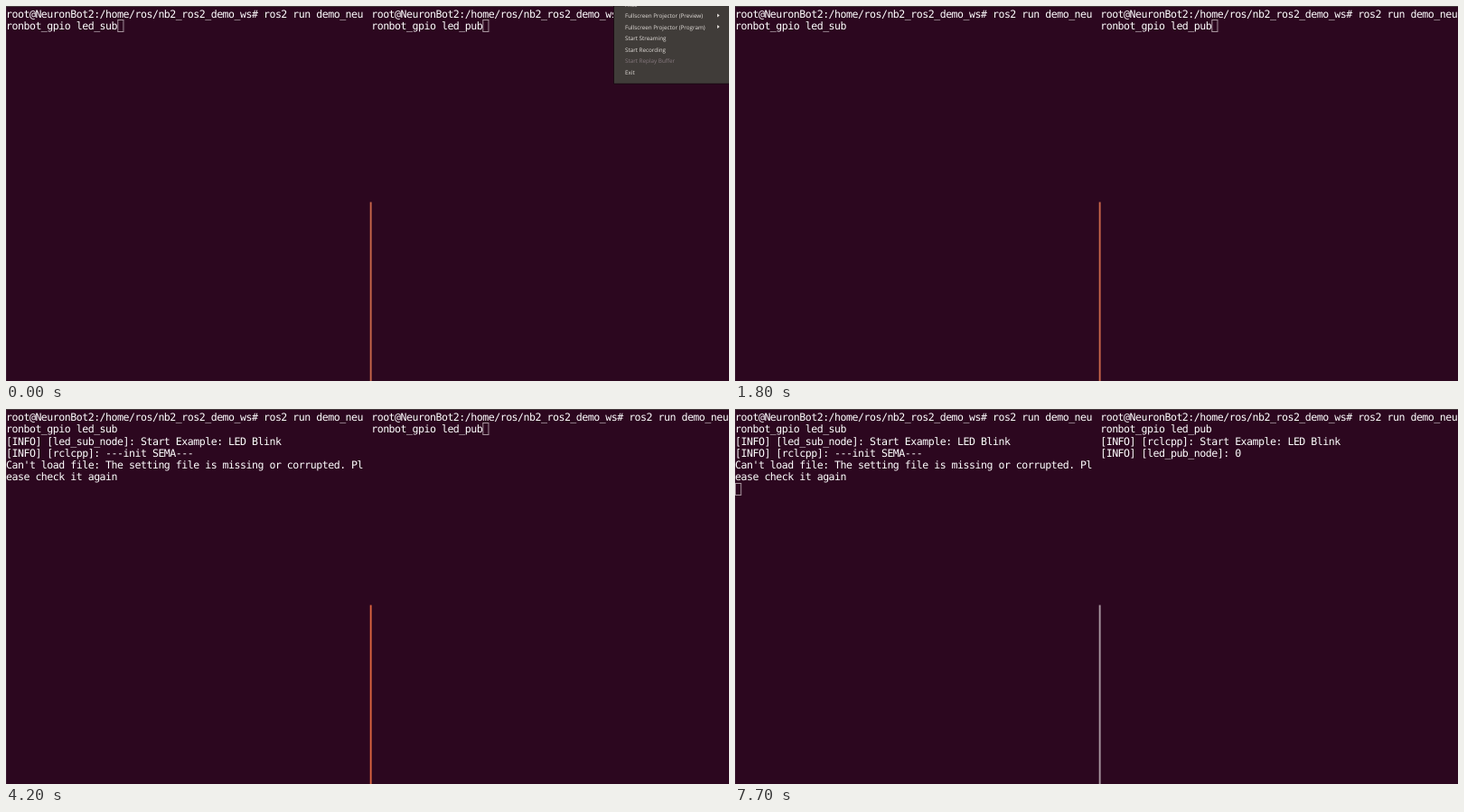
These frames come from a looping animation (800 px wide and 416 px high, 8000 ms). An HTML page:

```html
<!DOCTYPE html>
<html lang="en">
<head>
<meta charset="utf-8">
<title>Two terminals</title>
<style>
  html, body { margin: 0; width: 100%; height: 100%; overflow: hidden; background: #2c071f; }
  svg { display: block; width: 800px; height: 416px; }
  text { text-rendering: geometricPrecision; white-space: pre; }
  .term { font: 11.6px "DejaVu Sans Mono", monospace; letter-spacing: -.504px; fill: #fff; }
  .menu { font: 6.3px "Open Sans", sans-serif; fill: #e4e0dc; }
  .menu .off { fill: #85787e; }
  .block { fill: #fff; }
  .hollow { fill: none; stroke: #a8969f; }

  /* One 8 s loop: 1% is 80 ms, every change is hard. */
  .t { animation: 8s step-end infinite; }

  .menu { animation-name: menu; }
  .beam { animation-name: beam; }
  .split { animation-name: split; }
  .l-idle { animation-name: l-idle; }
  .l-type { animation-name: l-type; }
  .l-enter { animation-name: l-enter; }
  .l-wait { animation-name: l-wait; }
  .l-blur { animation-name: l-blur; }
  .l-info { animation-name: l-info; }
  .l-error { animation-name: l-error; }
  .r-idle { animation-name: r-idle; }
  .r-type { animation-name: r-type; }
  .r-enter { animation-name: r-enter; }
  .r-info { animation-name: r-info; }

  @keyframes menu {
    0% { opacity: 1; transform: none; }
    1.25% { opacity: .11; transform: translateY(4px); }
    2.5% { opacity: .04; transform: translateY(4px); }
    3.75%, 100% { opacity: 0; transform: translateY(4px); }
  }
  @keyframes beam { 0%, 2.5%, 100% { opacity: 0; } 1.25% { opacity: 1; } }
  @keyframes split {
    0% { fill: #c8664a; }
    52.5% { fill: #db6440; }
    66.25%, 100% { fill: #a8959f; }
  }
  @keyframes l-idle { 0% { opacity: 1; } 1.25%, 100% { opacity: 0; } }
  @keyframes l-type { 0%, 7.5%, 22.5%, 100% { opacity: 0; } 1.25%, 15% { opacity: 1; } }
  @keyframes l-enter { 0%, 37.5%, 100% { opacity: 0; } 30% { opacity: 1; } }
  @keyframes l-wait { 0%, 52.5%, 66.25%, 100% { opacity: 0; } 45%, 60% { opacity: 1; } }
  @keyframes l-blur { 0% { opacity: 0; } 66.25%, 100% { opacity: 1; } }
  @keyframes l-info { 0% { opacity: 0; } 37.5%, 100% { opacity: 1; } }
  @keyframes l-error { 0% { opacity: 0; } 38.75%, 100% { opacity: 1; } }
  @keyframes r-idle { 0% { opacity: 1; } 66.25%, 100% { opacity: 0; } }
  @keyframes r-type { 0%, 73.75%, 87.5%, 100% { opacity: 0; } 66.25%, 81.25% { opacity: 1; } }
  @keyframes r-enter { 0%, 93.75%, 100% { opacity: 0; } 87.5% { opacity: 1; } }
  @keyframes r-info { 0% { opacity: 0; } 96.25%, 100% { opacity: 1; } }
</style>
</head>
<body>
<svg viewBox="0 0 800 416">
  <defs>
    <rect id="block" width="6.6" height="13.5"/>
    <rect id="hollow" x=".5" y=".5" width="6.2" height="13"/>
    <path id="arrow" d="M0-2 2.6 0 0 2Z"/>
  </defs>
  <rect width="800" height="416" fill="#2c071f"/>
  <path d="M0 .5H800" stroke="#453a3c"/>
  <path d="M.3 1V416" stroke="#4a3043" stroke-width=".6"/>
  <rect class="t split" x="402.7" y="217.5" width="1.9" height="198.5"/>

  <g class="term">
    <text x="0" y="13">root@NeuronBot2:/home/ros/nb2_ros2_demo_ws# ros2 run demo_neu</text>
    <text x="0" y="26">ronbot_gpio led_sub</text>
    <g class="t l-info">
      <text x="0" y="39.6">[INFO] [led_sub_node]: Start Example: LED Blink</text>
      <text x="0" y="53">[INFO] [rclcpp]: ---init SEMA---</text>
    </g>
    <g class="t l-error">
      <text x="0" y="66">Can't load file: The setting file is missing or corrupted. Pl</text>
      <text x="0" y="79.4">ease check it again</text>
    </g>
  </g>
  <use href="#hollow" class="t hollow l-idle" x="123.3" y="15"/>
  <use href="#block" class="t block l-type" x="123.5" y="15"/>
  <use href="#block" class="t block l-enter" x=".5" y="28.3"/>
  <use href="#block" class="t block l-wait" x=".5" y="82"/>
  <use href="#hollow" class="t hollow l-blur" x="0" y="82"/>

  <g class="term">
    <text x="404.2" y="13">root@NeuronBot2:/home/ros/nb2_ros2_demo_ws# ros2 run demo_neu</text>
    <text x="404.2" y="26">ronbot_gpio led_pub</text>
    <g class="t r-info">
      <text x="404.2" y="39.6">[INFO] [rclcpp]: Start Example: LED Blink</text>
      <text x="404.2" y="53">[INFO] [led_pub_node]: 0</text>
    </g>
  </g>
  <use href="#hollow" class="t hollow r-idle" x="527.3" y="15"/>
  <use href="#block" class="t block r-type" x="527.5" y="15"/>
  <use href="#block" class="t block r-enter" x="404.5" y="28.3"/>

  <g class="t menu">
    <rect x="672" y="-5" width="130" height="91" fill="#403c39"/>
    <path d="M672.5-5V86.3H800" fill="none" stroke="#1d0b15"/>
    <text x="685" y=".8">Hide</text>
    <text x="685" y="13">Fullscreen Projector (Preview)</text>
    <text x="685" y="25.5">Fullscreen Projector (Program)</text>
    <text x="685" y="38">Start Streaming</text>
    <text x="685" y="50.5">Start Recording</text>
    <text x="685" y="63" class="off">Start Replay Buffer</text>
    <text x="685" y="75.5">Exit</text>
    <use href="#arrow" x="787" y="10.5"/>
    <use href="#arrow" x="787" y="23"/>
  </g>
  <path class="t beam" d="M705 44.2H708M706.5 44.2V50M705 50H708" fill="none" stroke="#b9adb5" stroke-width=".8"/>
</svg>
</body>
</html>
```
